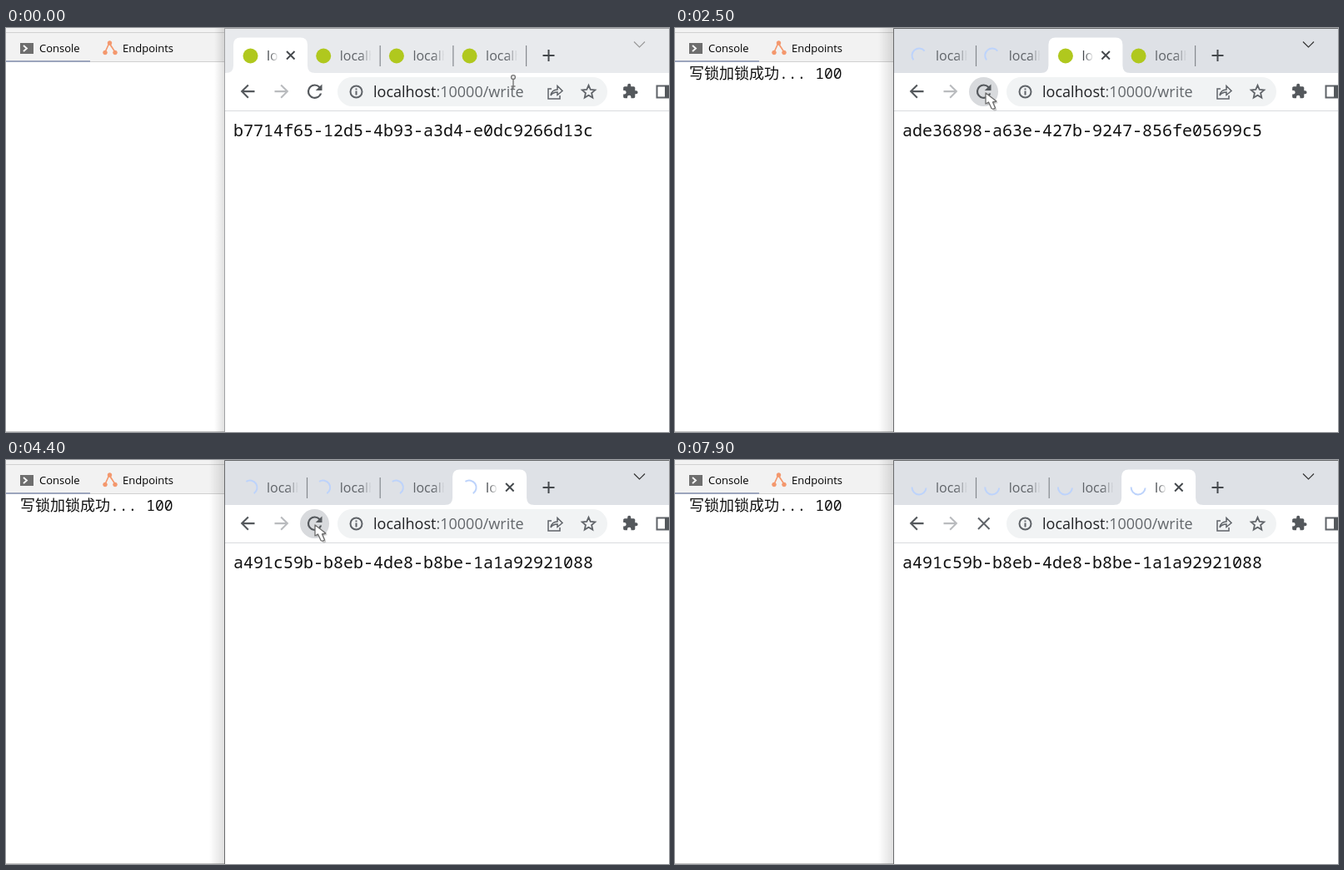
An HTML page for the animation above (8 s loop, 796 by 485 pixels).

```html
<!DOCTYPE html>
<html lang="en">
<head>
<meta charset="utf-8">
<title>Write lock demo</title>
<style>
  html, body { margin: 0; width: 100%; height: 100%; overflow: hidden; background: #fff; }
  svg { display: block; width: 796px; height: 485px; }
  text { font-family: "Open Sans", "Noto Sans", sans-serif; white-space: pre; }
  .mono { font-family: "Noto Sans Mono", "Noto Sans CJK SC", "Noto Sans CJK", monospace; }
  .line { fill: none; stroke: #5f6368; stroke-width: 2; }
</style>
</head>
<body>
<svg viewBox="0 0 796 485">
  <defs>
    <linearGradient id="fadeLong" gradientUnits="userSpaceOnUse" x1="65" x2="78" y1="0" y2="0">
      <stop offset="0" stop-color="#5f6368"/><stop offset="1" stop-color="#5f6368" stop-opacity="0"/>
    </linearGradient>
    <linearGradient id="fadeShort" gradientUnits="userSpaceOnUse" x1="43" x2="54" y1="0" y2="0">
      <stop offset="0" stop-color="#45494d"/><stop offset="1" stop-color="#45494d" stop-opacity="0"/>
    </linearGradient>
    <linearGradient id="shade">
      <stop offset="0" stop-opacity="0"/><stop offset="1" stop-opacity=".13"/>
    </linearGradient>
  </defs>

  <!-- console panel -->
  <rect width="796" height="485" fill="#fff"/>
  <rect width="263" height="40" fill="#f2f2f2"/>
  <path d="M0 5.5H263M0 40.5H263" stroke="#d1d1d1"/>
  <path d="M0 484.5H263" stroke="#c4c4c4"/>
  <path d="M0 40H101" stroke="#9ca5bd" stroke-width="2"/>
  <rect x="17" y="18" width="16" height="13" fill="#6e6e6e"/>
  <path d="M21 21l4 3.5-4 3.5" fill="none" stroke="#fff" stroke-width="1.8"/>
  <text x="40" y="29" font-size="13">Console</text>
  <g fill="#f4976c" stroke="#f4976c">
    <path d="M119 29L124 18L131 29M124 18L127 23" fill="none" stroke-width="1.6"/>
    <circle cx="124.500" cy="18" r="2.300"/><circle cx="119" cy="29.500" r="2.300"/><circle cx="131" cy="29.500" r="2.300"/>
  </g>
  <text x="140" y="29" font-size="13">Endpoints</text>
  <text id="log" class="mono" x="17" y="61" font-size="18" fill="#111">写锁加锁成功... 100</text>

  <!-- browser window -->
  <rect id="shadow" y="0" height="485" fill="url(#shade)"/>
  <rect x="263" width="533" height="485" fill="#fff"/>
  <rect id="strip" x="263" width="533" height="54"/>
  <g id="tabs"></g>
  <path d="M651.500 26V40M644.500 33H658.500" stroke="#44484c" stroke-width="2"/>
  <path id="chevron" d="M754 16.500l6.500 6.500 6.500-6.500" fill="none" stroke-width="1.2"/>
  <path d="M263 99.500H796" stroke="#d9dbde"/>
  <path id="frame" d="M796 .5H262.500V485" fill="none"/>

  <circle id="halo" cx="370.500" cy="76.500" r="17.500" fill="#d8dadd"/>
  <path id="back" transform="translate(277.500 63.500) scale(1.05)" fill="#54585c" d="M20 11H7.830l5.590-5.590L12 4l-8 8 8 8 1.410-1.410L7.830 13H20z"/>
  <path transform="translate(343.500 63.500) scale(-1.05 1.05)" fill="#b9bbbe" d="M20 11H7.830l5.590-5.590L12 4l-8 8 8 8 1.410-1.410L7.830 13H20z"/>
  <path id="reload" transform="translate(357.500 63) scale(1.1)" fill="#54585c" d="M17.650 6.350A7.960 7.960 0 0 0 12 4a8 8 0 1 0 7.730 10h-2.080A6 6 0 1 1 12 6c1.660 0 3.140.69 4.220 1.780L13 11h7V4z"/>
  <path id="stop" class="line" d="M364 69.500l13.500 13.500M377.500 69.500L364 83"/>

  <rect id="bar" x="398" y="59" width="324" height="35" rx="17.500"/>
  <circle cx="420.500" cy="76.500" r="7" class="line"/>
  <path d="M420.500 75.500V80.500M420.500 72.500V74.300" class="line"/>
  <text x="441" y="83" font-size="18" fill="#202124">localhost<tspan fill="#63676b">:10000/write</tspan></text>
  <g class="line" stroke-width="1.500">
    <path style="stroke-width:1.500" d="M655 73H651V85H665V81M654 81C655 76 658 74 662 74V69.500L668 75.500L662 80.500V77C658 77 656 78 654 81Z"/>
    <path id="star" style="stroke-width:1.800"/>
  </g>
  <path transform="translate(739.500 66) scale(.83)" fill="#54585c" d="M20.500 11H19V7c0-1.100-.9-2-2-2h-4V3.500a2.500 2.500 0 0 0-5 0V5H4c-1.100 0-2 .9-2 2v3.800h1.500a2.700 2.700 0 0 1 0 5.400H2V20c0 1.100.9 2 2 2h3.800v-1.500a2.700 2.700 0 0 1 5.400 0V22H17c1.100 0 2-.9 2-2v-4h1.500a2.500 2.500 0 0 0 0-5z"/>
  <path d="M800 69.500H781.500V83.500H800" class="line"/>
  <rect x="791" y="69" width="5" height="15" fill="#54585c"/>
  <text id="page" class="mono" x="273" y="130" font-size="20" fill="#111"></text>

  <g id="arrow">
    <path d="M1 1L1 14L4.500 12L8 20Q10 22 13 20L10 12.500L14.500 11.500Z" transform="translate(1.500 1.500)" fill="#000" opacity=".2"/>
    <path d="M1 1L1 14L4.500 12L8 19.500Q10 21 12.500 19L9.500 12L14 11Z" fill="#fff" stroke="#6c6c6c" stroke-width="1.300" stroke-linejoin="round"/>
  </g>
  <g id="beam" fill="none" stroke="#777" stroke-width="1.400">
    <circle cy="-7" r="2.400" fill="#eee"/><path d="M0 -4.500V8M-2.500 4H2.500"/>
  </g>
</svg>
<script>
const LOOP = 8000, STEP = 100, TAB_W = 87.700;
const $ = id => document.getElementById(id);
const set = (el, attrs) => { for (const k in attrs) el.setAttribute(k, attrs[k]); };
const show = (el, on) => { el.style.display = on ? '' : 'none'; };

const pages = [
  'b7714f65-12d5-4b93-a3d4-e0dc9266d13c',
  'a48d276d-3755-4575-8f73-23fef96a7f59',
  'ade36898-a63e-427b-9247-856fe05699c5',
  'a491c59b-b8eb-4de8-b8be-1a1a92921088'
];
const opened = [0, 1200, 2200, 3500];
const loading = [700, 1700, 2700, 4200];
const leaving = [800, 1800, 2800, 4600];
const WINDOW_ACTIVE = 600, LOGGED = 1000, CURSOR_GONE = 4500;

// time, x, y
const mousePath = [[0, 609, 66], [100, 590, 67], [500, 372, 77], [700, 370, 77], [1000, 397, 34],
  [1200, 400, 35], [1500, 371, 77], [1700, 370, 77], [2100, 456, 37], [2200, 468, 36],
  [2500, 372, 77], [2700, 370, 77], [3100, 517, 63], [3400, 566, 36], [3500, 566, 36],
  [4000, 373, 80], [4200, 370, 77], [4500, 370, 77]];
// time, degrees turned
const spinPath = [[700, 0], [1000, 80], [2100, 380], [3100, 653], [4400, 1113], [5600, 1440], [8000, 2094]];

function along(path, t, ease = u => u) {
  let i = 0;
  while (i < path.length - 2 && t >= path[i + 1][0]) i++;
  const a = path[i], b = path[i + 1];
  const u = ease(Math.min(1, Math.max(0, (t - a[0]) / (b[0] - a[0]))));
  return a.slice(1).map((v, k) => v + (b[k + 1] - v) * u);
}
const smooth = u => u * u * (3 - 2 * u);

$('star').setAttribute('d', 'M' + Array.from({ length: 10 }, (_, i) => {
  const a = (i / 5 - .5) * Math.PI, r = i % 2 ? 3.800 : 8.200;
  return `${(699.500 + r * Math.cos(a)).toFixed(2)} ${(77 + r * Math.sin(a)).toFixed(2)}`;
}).join('L') + 'Z');

const tabs = pages.map((_, i) => {
  const g = document.createElementNS('http://www.w3.org/2000/svg', 'g');
  g.setAttribute('transform', `translate(${273 + TAB_W * i} 0)`);
  g.innerHTML = `
    <path class="shape" d="M-9 54Q0 54 0 45V20Q0 11.500 8.500 11.500H80.500Q89 11.500 89 20V45Q89 54 98 54Z"/>
    <path class="sep" d="M88.500 21V46" stroke="#85898e" stroke-width="1.200"/>
    <circle class="icon" cx="20.500" cy="33.500" r="9" fill="#b0c81e"/>
    <path class="spin" fill="none" stroke="#bdd3fb" stroke-width="2"/>
    <text class="title" x="40" y="39" font-size="16">localhost</text>
    <path class="close" d="M64 28l9.500 9.500M73.500 28L64 37.500" stroke="#44484c" stroke-width="1.900"/>`;
  $('tabs').append(g);
  return Object.fromEntries([...g.children].map(el => [el.getAttribute('class'), el]));
});

// The leading end turns anticlockwise from twelve; the tail follows half a turn behind.
function spinner(turn) {
  const point = deg => {
    const a = (deg + 90) * Math.PI / 180;
    return `${(20 + 8.500 * Math.cos(a)).toFixed(2)} ${(33 - 8.500 * Math.sin(a)).toFixed(2)}`;
  };
  return `M${point(Math.max(0, turn - 180))}A8.500 8.500 0 0 0 ${point(turn)}`;
}

function draw(t) {
  const focused = t >= WINDOW_ACTIVE;
  const current = opened.filter(s => t >= s).length - 1;
  const [x, y] = along(mousePath, t, smooth);
  const visible = t < CURSOR_GONE;
  const overBar = visible && x > 398 && x < 722 && y > 55 && y < 94;
  const overReload = visible && Math.hypot(x - 370.500, y - 76.500) < 18;
  const hovered = visible && focused && y > 11 && y < 36.500 ? Math.floor((x - 273) / TAB_W) : -1;
  const turn = along(spinPath, t)[0];

  $('strip').setAttribute('fill', focused ? '#dee1e6' : '#e8eaed');
  $('frame').setAttribute('stroke', focused ? '#68696b' : '#a0a1a3');
  $('chevron').setAttribute('stroke', focused ? '#333' : '#999');
  set($('shadow'), focused ? { x: 244, width: 19 } : { x: 250, width: 13 });
  show($('log'), t >= LOGGED);
  $('page').textContent = pages[current];
  $('bar').setAttribute('fill', overBar && focused ? '#eaecee' : '#f1f3f4');

  tabs.forEach((tab, i) => {
    const active = i === current, busy = t >= loading[i];
    show(tab.shape, active || i === hovered);
    tab.shape.setAttribute('fill', active ? '#fff' : '#e8ebf0');
    show(tab.sep, ![i, i + 1].some(k => k === current || k === hovered));
    show(tab.icon, !busy);
    show(tab.spin, busy);
    tab.spin.setAttribute('d', spinner(turn));
    tab.title.setAttribute('fill', `url(#fade${active ? 'Short' : 'Long'})`);
    show(tab.close, active);
  });

  const busy = t >= leaving[current];
  show($('stop'), busy);
  show($('reload'), !busy);
  const left = leaving.filter(s => t >= s).pop();
  const fade = left === undefined ? 0 : Math.max(0, 1 - (t - left) / 700);
  $('halo').setAttribute('opacity', overReload || t >= CURSOR_GONE && t < leaving[3] ? 1 : fade);

  show($('arrow'), visible && !overBar);
  show($('beam'), overBar);
  for (const id of ['arrow', 'beam']) $(id).setAttribute('transform', `translate(${x} ${y})`);
}

const start = performance.now();
function tick() {
  const t = (performance.now() - start) % LOOP;
  draw(Math.floor(t / STEP) * STEP);
  requestAnimationFrame(tick);
}
draw(0);
requestAnimationFrame(tick);
</script>
</body>
</html>
```
